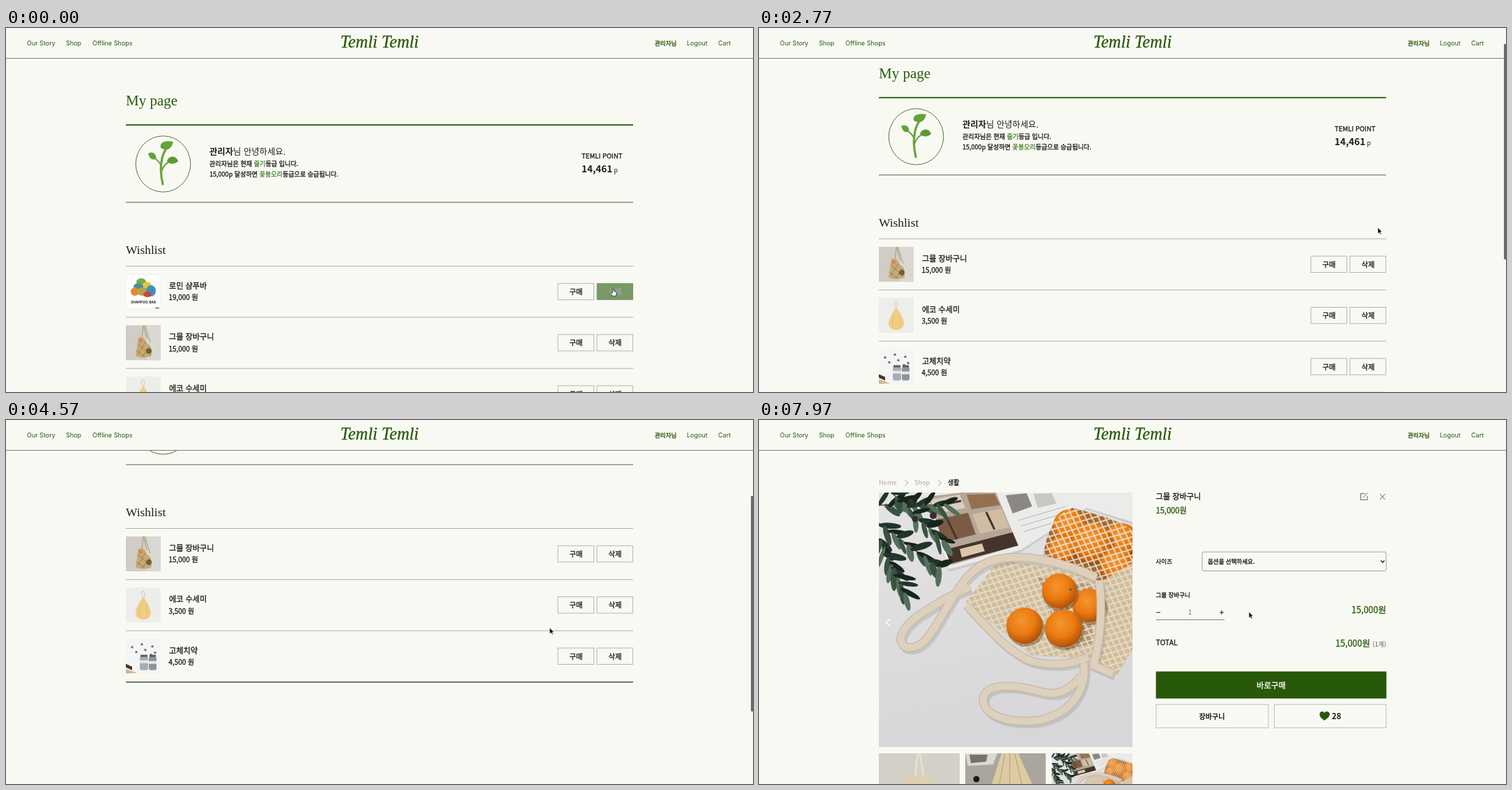
Animation, 1072 px wide and 522 px high, one loop 8 s. Source, as an HTML page:

```html
<!DOCTYPE html>
<html lang="ko">
<head>
<meta charset="utf-8">
<title>My page</title>
<style>
html, body { margin: 0; width: 100%; height: 100%; overflow: hidden; background: #f9f9f4; }
svg { display: block; width: 1072px; height: 522px; }
text { font-family: "Noto Sans CJK KR", "Noto Sans CJK", sans-serif; white-space: pre; stroke-width: 0; }
text[font-weight="500"] { stroke-width: .3px; }
.nav { font-family: Inter, "Noto Sans CJK KR", sans-serif; }
.title { font-family: "Liberation Serif", serif; }
</style>
</head>
<body>
<svg id="stage" viewBox="0 0 1072 522" xmlns="http://www.w3.org/2000/svg"></svg>
<script>
const BG = '#f9f9f4', GREEN = '#28590a', LEAF = '#4e8a35', INK = '#1c1c1a', LOOP = 8000, ROW = 73.35;

// Markup helpers
const text = (x, y, size, str, more = '') =>
  `<text x="${x}" y="${y}" font-size="${size}" fill="${INK}" stroke="${INK}" ${more}>${str}</text>`;
const rect = (x, y, w, h, fill, more = '') =>
  `<rect x="${x}" y="${y}" width="${w}" height="${h}" fill="${fill}" ${more}/>`;
const path = (d, fill, more = '') => `<path d="${d}" fill="${fill}" ${more}/>`;
const line = (d, color, w = 1, more = '') => path(d, 'none', `stroke="${color}" stroke-width="${w}" ${more}`);
const dot = (x, y, r, fill) => `<circle cx="${x}" cy="${y}" r="${r}" fill="${fill}"/>`;
const oval = (x, y, rx, ry, fill, more = '') =>
  `<ellipse cx="${x}" cy="${y}" rx="${rx}" ry="${ry}" fill="${fill}" ${more}/>`;
const group = (id, body, more = '') => `<g id="${id}" ${more}>${body}</g>`;
const tint = c => ` style="fill:${c};stroke:${c}"`;
const word = (s, c) => `<tspan${tint(c)}>${s}</tspan>`;
const MID = ' text-anchor="middle"', END = ' text-anchor="end"', MED = ' font-weight="500"', BOLD = ' font-weight="700"';

let seed = 7;
const rand = () => (seed = (seed * 16807) % 2147483647) / 2147483647;

const header = () => rect(0, 0, 1072, 43, BG) + rect(0, 43, 1072, 1, '#7c8278') +
  [[30, 'Our Story'], [86, 'Shop'], [124, 'Offline Shops'], [977, 'Logout'], [1022, 'Cart']]
    .map(([x, s]) => text(x, 24.9, 9, s, 'class="nav"' + tint(GREEN))).join('') +
  text(931, 24.8, 8.5, '관리자님', MED + tint(GREEN)) +
  text(536, 28.3, 24.4, 'Temli Temli', 'class="title" font-style="italic"' + MED + MID + tint(GREEN));

// Small product pictures, 50 by 50
const thumbs = [
  () => rect(0.25, 0.25, 49.5, 49.5, '#fff', 'stroke="#e4e4e0" stroke-width=".5"') +
    [[22, 11, 7, 5, '#6fae4c'], [30, 17, 7, 6, '#e9c33c'], [18, 18, 7, 5, '#4d8c9c'], [13, 25, 6, 6, '#dc8c3a'],
     [24, 25, 8, 6, '#b8a04a'], [36, 24, 7, 8, '#3f8fc4'], [31, 29, 6, 4, '#c84a38']].map(a => oval(...a)).join('') +
    text(25, 41.5, 4.9, 'SHAMPOO BAR', BOLD + MID) + rect(42, 48, 6, 1, '#444'),
  () => rect(0, 0, 50, 50, '#cfcdc5') + rect(30, 0, 20, 50, '#d9d8d3') +
    line('M25 0L23 18M25 0L31 20M27 0L35 24', '#b09a6c', 1) +
    path('M18 18Q25 14 29 24L36 31L37 44Q25 49 14 44Z', '#c9a974') +
    line('M17 26L35 42M15 36L27 45M28 24L17 42M34 31L24 45', '#8f7444', .8) +
    dot(33, 37, 4, '#6c6238') + dot(21, 22, 3, '#d9835c'),
  () => rect(0, 0, 50, 50, '#ededea') + line('M25 16Q20 5 25 5Q29 6 25 16', '#cfc8b8', 1) +
    path('M25 13C30 20 36 30 36 37C35 49 15 49 14 37C14 30 20 20 25 13Z', '#efcd85') +
    line('M22 22Q18 34 20 43M28 22Q32 34 30 43', '#e2b966', .7),
  () => rect(0, 0, 50, 50, '#f5f5f4') +
    [[23, 8], [38, 11], [15, 19], [28, 16], [36, 23], [9, 12], [42, 20]].map(p => dot(...p, 1.7, '#6f7178')).join('') +
    rect(20, 25, 12, 20, '#a9adb3', 'rx="3"') + rect(33, 25, 11, 20, '#8f949c', 'rx="3"') +
    rect(20, 31, 12, 4, '#e6e7e9') + rect(33, 32, 11, 4, '#e6e7e9') + rect(21, 23, 10, 3, '#5a5d63') + rect(34, 23, 9, 3, '#5a5d63') +
    path('M0 36L9 40L9 45L0 41Z', '#44352c') + path('M0 43L16 49L0 50Z', '#d9b48e')
];

const products = [['로민 샴푸바', '19,000 원'], ['그물 장바구니', '15,000 원'], ['에코 수세미', '3,500 원'], ['고체치약', '4,500 원']];
const button = (x, y, label) => rect(x, y + .3, 51.6, 23.4, 'none', 'stroke="#b4b5b3"') + text(x + 26, y + 16.1, 10.3, label, MID + MED);

const row = ([name, price], i) => {
  const y = 341.5 + ROW * i;
  return group('row' + i, line(`M172 ${y}H900`, '#b0b1ad') +
    `<g transform="translate(172 ${y + 11.5})">${thumbs[i]()}</g>` +
    text(234, y + 32.6, 11.15, name, MED) + text(233.5, y + 48.8, 9.9, price, MED) +
    button(792, y + 24.5, '구매') + button(848, y + 24.5, '삭제'));
};

const sprout = () => oval(225.5, 195, 39.3, 40.2, 'none', 'stroke="#3d6a2a" stroke-width=".9"') +
  line('M225 224C222 211 221 199 224 187Q226 178 232 170', '#6ca23c', 3.2, 'stroke-linecap="round"') +
  line('M222.5 197Q219 190 211 185M223 206Q226 195 236 191', '#6ca23c', 2) +
  path('M222 172C220 163 230 161 240 163C238 172 232 178 222 172Z', '#62a338') +
  path('M204 180C210 176 217 181 215 188C208 190 206 186 204 180Z', '#62a338') +
  path('M231 191C233 183 244 182 247 191C242 196 235 196 231 191Z', '#5a9b34');

const myPage = () => text(172, 111, 21, 'My page', 'class="title"' + tint(GREEN)) +
  rect(172, 138, 728, 2, '#3a6a1d') + sprout() +
  text(292, 182.4, 12.35, `<tspan${BOLD}>관리자</tspan>님 안녕하세요.`) +
  text(292, 198, 9.1, `관리자님은 현재 ${word('줄기', LEAF)}등급 입니다.`, MED) +
  text(292, 213.2, 9.05, `15,000p 달성하면 ${word('꽃봉오리', LEAF)}등급으로 승급됩니다.`, MED) +
  text(826, 187.4, 9.6, 'TEMLI POINT', MED) +
  text(826, 207, 13.5, '14,461', BOLD) + text(872.5, 207, 9, 'p') +
  rect(172, 249.5, 728, 1, '#56604f') +
  text(172, 324, 17.4, 'Wishlist', 'class="title"') +
  group('rows', products.map(row).join('') + rect(172, 634.4, 728, 1.5, '#4c4e49')) +
  ['구매', '삭제'].map((s, i) => group('hot' + i, rect(792 + 56 * i, 366, 52, 24, BG) +
    text(818 + 56 * i, 382.1, 10.3, s, MID + MED))).join('');

// Still life with the net bag
const leaves = () => {
  const shades = ['#22352a', '#3a5242', '#18251d', '#566f5a'];
  let out = '';
  [[172, 122, 266, 122], [172, 148, 258, 212], [172, 170, 208, 246], [190, 104, 262, 172]].forEach(([x1, y1, x2, y2]) => {
    const base = Math.atan2(y2 - y1, x2 - x1) * 57.3;
    out += line(`M${x1} ${y1}L${x2} ${y2}`, '#4a4a38', 1.5);
    for (let k = 0; k < 16; k++) {
      const f = k / 15 + rand() * .05, turn = base + (k % 2 ? 1 : -1) * (10 + rand() * 50);
      out += oval(12, 0, 12 + rand() * 5, 3 + rand() * 2, shades[k % 4],
        `transform="translate(${x1 + (x2 - x1) * f} ${y1 + (y2 - y1) * f}) rotate(${turn})"`);
    }
  });
  return out + dot(250, 137, 5, '#3a2a30') + dot(224, 142, 4.5, '#33302c') + dot(218, 117, 4, '#3b3030');
};
const orange = ([x, y, r]) => oval(x + 2, y + 4, r + 1, r, '#5e3a1c', 'opacity=".4"') + dot(x, y, r, 'url(#peel)');
const strap = d => line(d, '#9b9890', 12, 'opacity=".35" transform="translate(3 4)"') +
  line(d, '#c3b39d', 12.5, 'stroke-linejoin="round"') + line(d, '#ddd0bd', 10.5, 'stroke-linejoin="round"');

const RIM = 'M345 200L424 212L490 232L482 342L392 338L296 262Z';
const SIDE = 'M490 232L536 205V330L514 366L484 350Z';

const scene = () => rect(172, 104, 364, 365, 'url(#table)') +
  path('M236 104H536V150L470 128L376 190L272 218Z', '#b9b9b9', 'opacity=".5"') +
  path('M236 104H536V146L470 126L376 186L272 214Z', '#ebebea') +
  path('M242 110L290 104H340L372 180L276 208Z', '#b5a698') +
  path('M246 114L288 107L296 126L252 135Z', '#d8cec2') + path('M298 107L338 106L346 122L305 128Z', '#94704f') +
  path('M254 143L300 133L311 164L264 176Z', '#7c5b45') + path('M306 135L348 127L360 154L317 163Z', '#d0bda4') +
  path('M267 186L364 161L372 180L275 206Z', '#45342b') + path('M288 185L320 177L324 188L291 197Z', '#dac7ab') +
  line('M268 138L284 171M326 132L338 157M252 124L290 116', '#473529', 3) +
  path('M354 108L384 105L392 124L364 134Z', '#8b8783') + path('M394 106L420 105L427 120L400 126Z', '#c9c7c4') +
  line('M372 144L440 124M376 152L430 136M380 160L420 148', '#b9b9b8', 1.2) +
  leaves() +
  path('M408 196Q414 140 450 126Q525 145 536 160V240L490 236Z', '#a4652f') +
  [[446, 152, 24], [436, 186, 20], [520, 172, 24], [478, 176, 29], [514, 208, 24]].map(orange).join('') +
  path('M406 196Q414 138 450 126Q525 145 536 160V240L490 236L424 214Z', 'url(#mesh)') +
  path(RIM, '#cdbd9f') + path('M400 226L480 236L478 320L440 330Z', '#8d6a40', 'opacity=".45"') + path(RIM, 'url(#mesh)') +
  path(SIDE, '#cebc9c') + path(SIDE, 'url(#mesh)') +
  [[474, 266, 24], [431, 245, 25], [381, 295, 26], [437, 299, 27]].map(orange).join('') +
  dot(447, 243, 2, '#6e6a34') +
  strap('M484 226C440 205 390 192 345 199C300 208 285 245 270 268C250 300 238 330 212 326C195 318 205 298 228 281C252 265 272 252 302 240') +
  strap('M298 266C330 300 360 335 392 346C425 354 450 350 472 340') +
  strap('M488 230Q496 290 480 352L508 364') +
  strap('M466 348C470 380 455 420 400 431C350 436 318 420 322 397C330 376 370 380 405 390C430 397 450 385 462 366');

const shopPage = () => text(172, 93.4, 9.1, 'Home', tint('#a9a9a6')) + text(223, 93.4, 9.1, 'Shop', tint('#a9a9a6')) +
  text(271, 93.4, 8.9, '생활', MED) + line('M209.5 86.5L214 90.2L209.5 94M257 86.5L261.5 90.2L257 94', '#a0a09c') +
  group('scene', scene(), 'clip-path="url(#frame)"') +
  line('M188 285L182.5 290.5L188 296', '#fff', 1.6) +
  rect(172, 478, 116, 44, '#d3d0c8') + line('M228 478L224 512M231 478L236 512', '#e8dfcc', 3) +
  path('M204 522Q212 506 230 510Q246 506 252 522Z', '#ded0b2') +
  rect(296, 478, 115.5, 44, '#aaa69d') + path('M296 478H342L336 494L300 496Z', '#d9d8d4') + path('M302 480H328L326 490L304 492Z', '#77726a') +
  path('M348 478H372L392 522H334Z', '#dccaa2') + line('M353 478L345 522M360 478V522M367 478L377 522', '#b59f74') + dot(312, 515, 4.5, '#191918') +
  '<use href="#scene" transform="translate(365.2 444.9) scale(.3187)"/>' +
  text(569.5, 113.7, 11.2, '그물 장바구니', MED) + text(569.5, 134, 11.1, '15,000원', MED + tint(GREEN)) +
  line('M870 105.5H863.5V114.5H873V109M867 111.5L873.5 104.5', '#666') +
  line('M891 106L898.5 114M898.5 106L891 114', '#666') +
  text(569.5, 206, 8.5, '사이즈', MED) + rect(636, 189.2, 264, 27.2, 'none', 'rx="2" stroke="#a3a59f"') +
  text(644, 206, 8.5, '옵션을 선택하세요.', MED) + line('M892.5 201.5L895 204.2L897.5 201.5', '#222', 1.4) +
  text(569.5, 254, 8.5, '그물 장바구니', MED) +
  line('M570 276H576M661 276H667M664 273V279', '#222', 1.1) + text(618.5, 279.3, 9, '1', MID + tint('#666')) +
  rect(570, 286, 98, 1, '#7d827c') +
  text(900, 277, 12.5, '15,000원', END + MED + tint(GREEN)) +
  text(569.5, 323.2, 10.4, 'TOTAL', MED) + text(877, 325, 12.5, '15,000원', END + MED + tint(GREEN)) +
  text(900, 324.5, 9.1, '(1개)', END + tint('#555')) +
  rect(569.6, 360.6, 330.8, 38.8, GREEN) + text(735, 384.5, 11.4, '바로구매', MID + MED + tint('#fff')) +
  rect(570, 408, 161, 33.4, 'none', 'stroke="#bdbeba"') + rect(739.5, 408, 160.5, 33.4, 'none', 'stroke="#bdbeba"') +
  text(650, 428.8, 10.1, '장바구니', MID + BOLD) +
  path('M811.5 431C806 427 804.5 425 804.5 422C804.5 417.5 810 416.5 811.5 420C813 416.5 819 417.5 819 422C819 425 817 427 811.5 431Z', GREEN) +
  text(822, 429.2, 11.4, '28', BOLD);

const defs = `<defs>
  <linearGradient id="table" x2=".2" y2="1"><stop stop-color="#e4e4e4"/><stop offset="1" stop-color="#d7d7da"/></linearGradient>
  <radialGradient id="peel" cx=".42" cy=".36" r=".68"><stop stop-color="#f5952f"/><stop offset=".55" stop-color="#e97a10"/><stop offset="1" stop-color="#a94b08"/></radialGradient>
  <pattern id="mesh" width="13" height="11" patternUnits="userSpaceOnUse" patternTransform="rotate(24)">${line('M0 0L13 11M13 0L0 11', '#eadcc4', 1.9)}</pattern>
  <clipPath id="frame"><rect x="172" y="104" width="364" height="365"/></clipPath></defs>`;

const $ = id => document.getElementById(id);
$('stage').innerHTML = defs + rect(0, 0, 1072, 522, BG) +
  group('my', myPage()) + group('shop', shopPage()) + header() +
  group('status', rect(0, 516.5, 355, 6, '#e3e3df') + text(2, 525, 8.2, 'temlitemli.test shop의 응답을 기다리는 중…', tint('#777'))) +
  rect(1069, 0, 3.5, 309, '#6c6d6b', 'id="bar" rx="1"') +
  group('arrow', path('M0 0V9L2.1 7.2L3.5 10.3L5 9.7L3.6 6.6H6.3Z', '#111', 'stroke="#fff" stroke-width=".6"')) +
  group('hand', path('M-.8 0Q.2 -1 1 0V3.5Q4.8 3.6 5 5.2V7.8L4 10.3H-1L-3.4 6.5Q-3 5 -.8 6.3Z', '#fff', 'stroke="#222" stroke-width=".8"'));

// Steps are [ms, value, value...], linear between them
const scrollSteps = [[2590, 0], [2770, 39], [3100, 90], [3400, 126], [3570, 143], [4250, 143], [4540, 186]];
const cursorSteps = [[1800, 871, 374], [2050, 877, 345], [2420, 888, 286], [4260, 888, 286], [4570, 780, 298],
  [4800, 800, 240], [5060, 817, 198], [6850, 817, 198], [7300, 775, 222], [7940, 703, 275]];
const barSteps = [[2580, 0], [2640, 1], [5150, 1], [5500, 0], [6129, 0], [6130, 1], [6620, 1], [6900, 0]];
const buySteps = [[5030, 0], [5330, 1]];
const deleteSteps = [[-180, 0], [120, 1], [1880, 1], [2180, 0]];
const DELETED = 700, SWAP = 6130;

function at(steps, t) {
  const n = steps.findIndex(s => s[0] > t);
  if (n < 0) return steps[steps.length - 1].slice(1);
  if (!n) return steps[0].slice(1);
  const a = steps[n - 1], b = steps[n], f = (t - a[0]) / (b[0] - a[0]);
  return a.slice(1).map((v, i) => v + (b[i + 1] - v) * f);
}
const show = (id, on) => $(id).setAttribute('display', on ? 'inline' : 'none');
const move = (id, x, y) => $(id).setAttribute('transform', `translate(${x} ${y})`);
const mix = (a, b, p) => `rgb(${a.map((v, i) => Math.round(v + (b[i] - v) * p))})`;

function hover(id, p) {
  show(id, p > 0);
  const [box, label] = $(id).children, ink = mix([28, 28, 26], [255, 255, 255], p);
  box.setAttribute('fill', mix([249, 249, 244], [40, 89, 10], p));
  label.setAttribute('fill', ink);
  label.setAttribute('stroke', ink);
}

function render(t) {
  const shop = t >= SWAP, gone = t >= DELETED;
  const [scroll] = at(scrollSteps, t), [x, y] = at(cursorSteps, t);
  show('my', !shop);
  show('shop', shop);
  move('my', 0, -scroll);
  move('rows', 0, gone ? -ROW : 0);
  show('row0', !gone);
  hover('hot0', at(buySteps, t)[0]);
  hover('hot1', at(deleteSteps, t)[0]);
  show('status', t >= 5960 && t < 6520);
  $('bar').setAttribute('y', shop ? 0 : scroll * .586);
  $('bar').setAttribute('height', shop ? 61 : 309);
  $('bar').setAttribute('opacity', at(barSteps, t)[0]);
  const hand = t < 1880 || (t >= 5030 && !shop);
  show('hand', hand);
  show('arrow', !hand);
  move(hand ? 'hand' : 'arrow', x, y);
}

const start = performance.now();
function tick() {
  render((performance.now() - start) % LOOP);
  requestAnimationFrame(tick);
}
tick();
</script>
</body>
</html>
```
